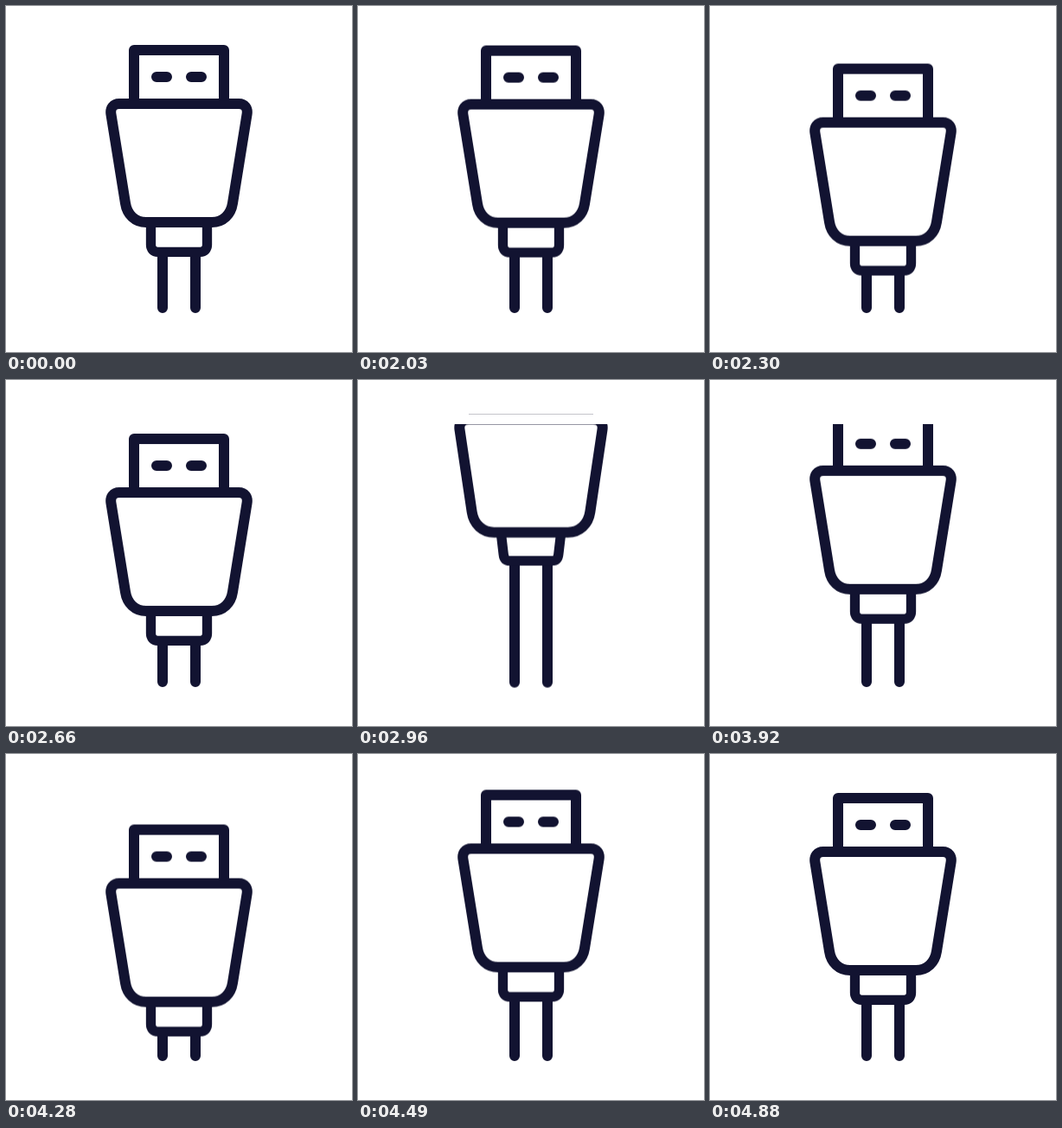
An HTML page for the animation above (4.91 s loop, 400 by 400 pixels).

```html
<!DOCTYPE html>
<html lang="en">
<head>
<meta charset="utf-8">
<title>Plug</title>
<style>
html, body { margin: 0; width: 100%; height: 100%; overflow: hidden; background: #fff; }
svg { display: block; width: 100vw; height: 100vh; }
.ink { fill: #fff; stroke: #121331; stroke-width: 12; stroke-linecap: round; stroke-linejoin: round; }
.plug, .cable, .neck, .body, .socket, .edge { animation: 4910ms linear infinite; }
.plug { animation-name: move; }
.cable { animation-name: cable; }
.neck { animation-name: neck; stroke-width: 11.3; }
.body { animation-name: body; }
.socket { animation-name: socket; animation-timing-function: step-end; }
.edge { animation-name: edge; animation-timing-function: step-end; }

@keyframes move {
  0%, 40.53% { transform: translateY(0); animation-timing-function: cubic-bezier(.33, 0, .67, 1); }
  51.83% { transform: translateY(36.6px); animation-timing-function: cubic-bezier(.45, 0, .17, 1); }
  61.51% { transform: translateY(-68.5px); }
  70.57% { transform: translateY(-68.5px); animation-timing-function: cubic-bezier(.33, 0, .67, 1); }
  87.47% { transform: translateY(36.6px); animation-timing-function: cubic-bezier(.33, 0, .67, 1); }
  92.67% { transform: translateY(-10px); animation-timing-function: cubic-bezier(.33, 0, .67, 1); }
  99.39%, 100% { transform: translateY(0); }
}

/* The plug is squeezed while it sits in the socket. */
@keyframes body {
  0%, 56.2%, 77.4%, 100% {
    d: path("M131 113H269C276 113 279.7 118 278.6 125L262 228C260 241 251 250 238 250H162C149 250 140 241 138 228L121.4 125C120.3 118 124 113 131 113Z");
    animation-timing-function: ease-in-out;
  }
  60.9%, 70.57% {
    d: path("M128 113H272C280 113 283.7 118 282.6 125L268.5 220C266.5 234 256 243.5 243 243.5H157C144 243.5 133.5 234 131.5 220L117.4 125C116.3 118 120 113 128 113Z");
    animation-timing-function: ease-in-out;
  }
}
@keyframes neck {
  0%, 56.2%, 77.4%, 100% {
    d: path("M167.5 250V276C167.5 281 170.5 284.3 175.5 284.3H224.5C229.5 284.3 232.5 281 232.5 276V250");
    animation-timing-function: ease-in-out;
  }
  60.9%, 70.57% {
    d: path("M165.2 243.5L168.2 269C168.7 274 171 276.6 176 276.6H224C229 276.6 231.3 274 231.8 269L234.8 243.5");
    animation-timing-function: ease-in-out;
  }
}
@keyframes cable {
  0%, 56.2%, 77.4%, 100% { transform: translateY(0); }
  60.9%, 70.57% { transform: translateY(.7px); }
}
@keyframes socket {
  0% { opacity: 0; }
  53% { opacity: 1; }
  85% { opacity: 0; }
  100% { opacity: 0; }
}
@keyframes edge {
  0% { opacity: 0; }
  59.98% { opacity: 1; }
  71.4% { opacity: 0; }
  100% { opacity: 0; }
}
</style>
</head>
<body>
<svg viewBox="0 0 400 400">
  <rect width="400" height="400" fill="#fff"/>
  <path class="ink cable" d="M181 207V349M219 207V349"/>
  <g class="ink plug">
    <path d="M148 113V51H252V113M174 82H186M214 82H226"/>
    <path class="neck" d="M167.5 250V276C167.5 281 170.5 284.3 175.5 284.3H224.5C229.5 284.3 232.5 281 232.5 276V250"/>
    <path class="body" d="M131 113H269C276 113 279.7 118 278.6 125L262 228C260 241 251 250 238 250H162C149 250 140 241 138 228L121.4 125C120.3 118 124 113 131 113Z"/>
  </g>
  <rect class="socket" width="400" height="51" fill="#fff"/>
  <path class="edge" d="M128 39.5H272" stroke="#c4c4cb"/>
</svg>
</body>
</html>
```
